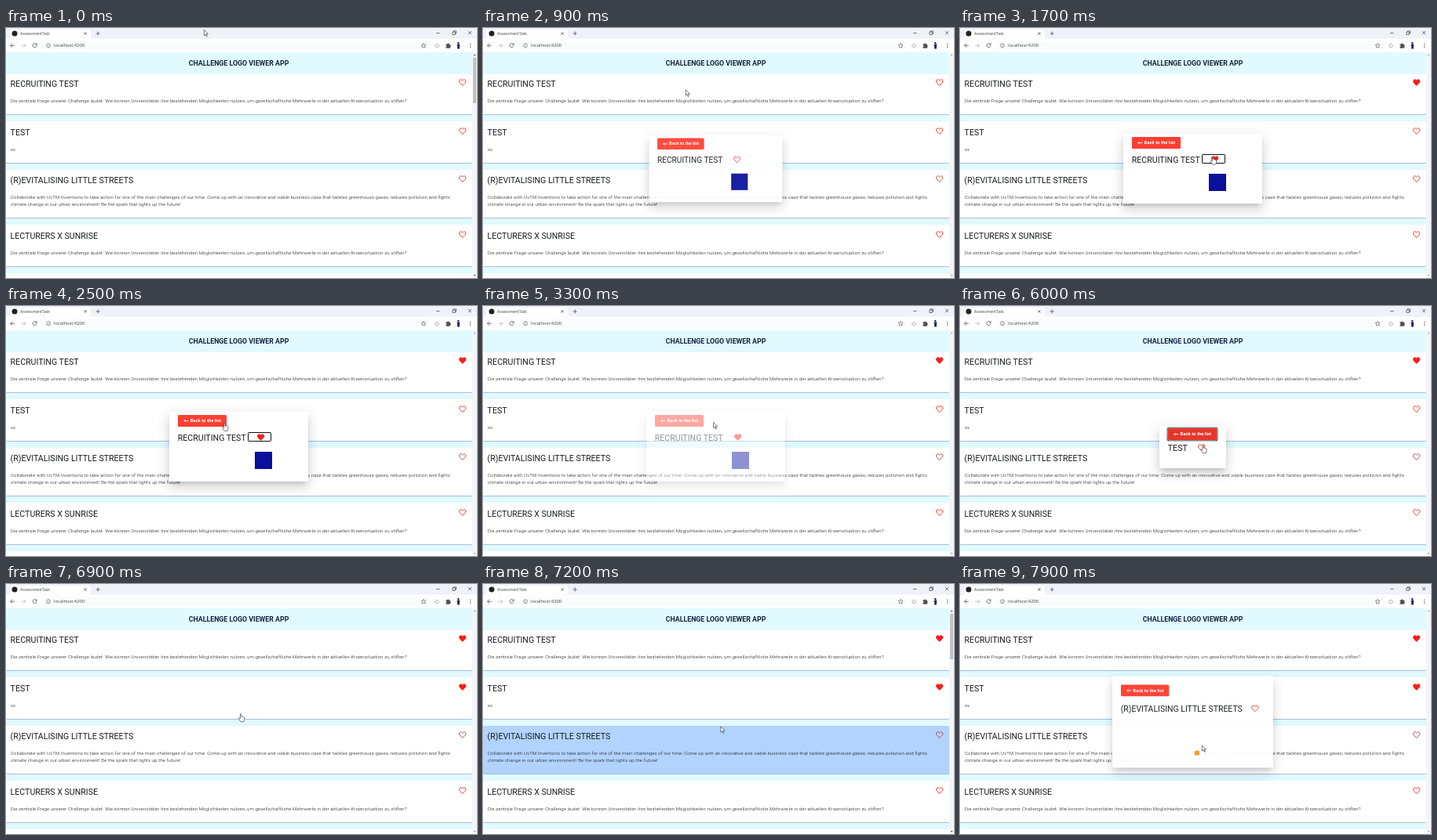
Animation of 600 by 319 pixels, one loop 8000 ms. Source, as an HTML page:

```html
<!DOCTYPE html>
<html lang="en">
<head>
<meta charset="utf-8">
<title>AssessmentTask</title>
<style>
  html, body { margin: 0; width: 100%; height: 100%; overflow: hidden; background: #e1faff; }
  #stage { position: relative; width: 600px; height: 319px; overflow: hidden; font-family: Roboto, sans-serif; color: #1b1c20; }
  #stage div, #stage svg { position: absolute; }
  .text { white-space: pre; line-height: 12px; }
  .head { left: 0; top: 31px; width: 593px; height: 28px; line-height: 28px; text-align: center;
    background: #e1faff; font-size: 8.8px; font-weight: 700; color: #14233f; }
  .title { font-size: 10.6px; }
  .desc { font-size: 6px; font-weight: 300; letter-spacing: .122px; line-height: 9px; color: #08090b; }
  .ui { font-family: "Open Sans", "Noto Sans", sans-serif; color: #3c4043; }
  .card { left: 0; width: 594px; background: #fff; border-radius: 1.5px; border-bottom: 1px solid #a6bfdc; box-sizing: border-box; }
  .bar { left: 594px; top: 31px; width: 6px; height: 288px; background: #f3f4f5; }
  .thumb { left: .8px; top: 7px; width: 4.6px; height: 58px; background: #c1c1c1; }
  .panel { background: #fff; border-radius: 1.5px;
    box-shadow: 0 4px 6px -3px rgba(0,0,0,.2), 0 9px 14px 1px rgba(0,0,0,.09), 0 3px 17px 3px rgba(0,10,50,.07); }
  .back { left: 11px; width: 62px; height: 15.2px; border-radius: 1.6px; background: #ff3f32; }
  .back .text { left: 15.6px; top: 1.6px; font-size: 5.9px; font-weight: 700; color: #fff; }
  .back.focus { background: #e8352a; box-shadow: 0 0 0 .5px #fff, 0 0 0 1.3px #101010; }
  .ring { width: 27.5px; height: 10px; border: 1px solid #101010; border-radius: 1.2px; }
</style>
</head>
<body>
<div id="stage"></div>
<script>
const LOOP = 8000, STEP = 100;
const stage = document.getElementById('stage');
const RED = '#f5281f';

function add(parent, cls, style, text) {
  const el = document.createElement('div');
  el.className = cls;
  for (const k in style) {
    const v = style[k];
    el.style[k] = typeof v === 'number' ? v + 'px' : v;
  }
  if (text) el.textContent = text;
  parent.appendChild(el);
  return el;
}

function svg(parent, x, y, w, h, box, body) {
  const el = document.createElementNS('http://www.w3.org/2000/svg', 'svg');
  el.setAttribute('viewBox', box);
  el.style.cssText = `left:${x}px;top:${y}px;width:${w}px;height:${h}px;overflow:visible`;
  el.innerHTML = body;
  parent.appendChild(el);
  return el;
}

// Heart icon centred on (cx, cy); fillable through its path
const HEART = 'M12 20C7 15.4 3 12.2 3 8.5C3 6 5 4 7.5 4C9.2 4 11 4.9 12 6.5C13 4.9 14.8 4 16.5 4C19 4 21 6 21 8.5C21 12.2 17 15.4 12 20Z';
function heart(parent, cx, cy, color = RED) {
  const el = svg(parent, cx - 5.6, cy - 5.6, 11.2, 11.2, '0 0 24 24',
    `<path d="${HEART}" fill="none" stroke="${color}" stroke-width="2"/>`);
  return on => {
    const p = el.firstChild;
    p.setAttribute('fill', on ? '#ff1d18' : 'none');
    p.setAttribute('stroke', on ? '#ff1d18' : color);
  };
}

// Browser window
svg(stage, 0, 0, 600, 31, '0 0 600 31', `
  <rect width="600" height="31" fill="#fff"/>
  <rect width="600" height="13.5" fill="#eff2f8"/>
  <path d="M3 13.6Q5 13.6 5 11V4.5Q5 2 7.5 2H105.5Q108 2 108 4.5V11Q108 13.6 110.5 13.6Z" fill="#fff"/>
  <circle cx="11" cy="7" r="3.5" fill="#222"/>
  <rect x="46" y="16.7" width="494" height="11" rx="5.5" fill="#fafbfc"/>
  <g fill="none" stroke="#50545a" stroke-width=".8">
    <path d="M99.5 5.3l3.2 3.2m0-3.2l-3.2 3.2M114.7 7h5m-2.5-2.5v5"/>
    <path d="M548 6.5h4.4M568.8 5h3.4v3.4h-3.4zM570 5v-1.2h3.4v3.4h-1.2M588.8 4l4.2 4.2m0-4.2l-4.2 4.2" stroke="#222" stroke-width=".6"/>
    <path d="M11 22.3H5.7m2.5-2.6l-2.6 2.6l2.6 2.6"/>
    <path d="M19.5 22.3h5.3m-2.5-2.6l2.6 2.6l-2.6 2.6" stroke="#b4b7bb"/>
    <path d="M38.6 20.4a2.6 2.6 0 1 0 .6 2.3m0-3.3v2h-2"/>
    <circle cx="54" cy="22.3" r="2.5" stroke-width=".6"/>
    <path d="M54 22v1.6m0-3v.7" stroke-width=".6"/>
    <path d="M532 19.4l.9 2l2.1.2l-1.6 1.4l.5 2.1l-1.9-1.1l-1.9 1.1l.5-2.1l-1.6-1.4l2.1-.2z" stroke-width=".6"/>
    <path d="M547.7 20.7a2.3 2.3 0 1 0 2.6 0M549 19.6v2.5" stroke="#8a8d92" stroke-width=".7"/>
  </g>
  <path d="M560.4 20.6h1.8a1 1 0 0 1 2 0h1.6v1.6a1 1 0 0 1 0 2v1.5h-5.4v-1.6a.9.9 0 0 0 0-1.8z" fill="#4d5156"/>
  <circle cx="576.2" cy="19.2" r="1.2" fill="#1a2558"/>
  <path d="M574.4 20.8h3.8l-.4 2.6v3h-2.8v-3z" fill="#1a2558"/>
  <g fill="#50545a"><circle cx="591.5" cy="20.2" r=".6"/><circle cx="591.5" cy="22.3" r=".6"/><circle cx="591.5" cy="24.4" r=".6"/></g>`);
add(stage, 'text ui', { left: 18, top: 1, fontSize: 5 }, 'AssessmentTask');
add(stage, 'text ui', { left: 61, top: 16.2, fontSize: 5.8 }, 'localhost:4200');

// Page
const question = 'Die zentrale Frage unserer Challenge lautet: Wie können Universitäten ihre bestehenden Möglichkeiten nutzen, um gesellschaftliche Mehrwerte in der aktuellen Krisensituation zu stiften?';
const green = '(R)EVITALISING LITTLE STREETS';
const cards = [
  [57.75, 53.25, 'RECRUITING TEST', question],
  [119.25, 53.25, 'TEST', 'xx'],
  [180.75, 62.25, green, 'Collaborate with UvTM Inventions to take action for one of the main challenges of our time: Come up with an innovative and viable business case that tackles greenhouse gases, reduces pollution and fights\nclimate change in our urban environment! Be the spark that lights up the future!', '#a9483a'],
  [251.25, 53.75, 'LECTURERS X SUNRISE', question],
  [313, 53.25]
].map(([top, height, name, desc, color]) => {
  const el = add(stage, 'card', { top, height });
  if (!name) return { el };
  add(el, 'text title', { left: 5.6, top: 8.3 }, name);
  add(el, 'text desc', { left: 6, top: 30.7 }, desc);
  return { el, like: heart(el, 581.5, 12.3, color) };
});
add(stage, 'head', {}, 'CHALLENGE LOGO VIEWER APP');

const bar = add(stage, 'bar', {});
const thumb = add(bar, 'thumb', {});
const arrows = svg(bar, 0, 0, 6, 288, '0 0 6 288', '<path d="M1.5 4.3L3 2.5L4.5 4.3ZM1.5 284L3 285.8L4.5 284Z"/>');

// Dialogs: box, button top, title centre, heart x, then life times and frames of [scale, opacity]
function dialog(o) {
  const el = add(stage, 'panel', { left: o.x, top: o.y, width: o.w, height: o.h });
  const back = add(el, 'back', { top: o.button });
  svg(back, 7, 5, 7, 5.2, '0 0 7 5.2', '<path d="M6.4 2.6H.9M2.6 .9L.9 2.6L2.6 4.3" fill="none" stroke="#fff" stroke-width=".9"/>');
  add(back, 'text', {}, 'Back to the list');
  add(el, 'text title', { left: 10.8, top: o.mid - 5.2 }, o.name);
  const ring = add(el, 'ring', { left: o.heart - 16, top: o.mid - 7.5 });
  const like = heart(el, o.heart, o.mid - 1);
  if (o.mark) {
    const [cx, cy, size, color] = o.mark;
    add(el, 'mark', { left: cx - size / 2, top: cy - size / 2, width: size, height: size, background: color });
  }
  return { ...o, el, back, ring, like };
}
const dialogs = [
  dialog({ x: 208, y: 135, w: 177, h: 89, button: 3.5, mid: 33.5, heart: 116.3, name: 'RECRUITING TEST',
    mark: [120, 62, 22, '#0a0f9c'], open: 900, focus: 1000, liked: 1600, unring: 2900, close: 3300, done: 3500,
    intro: [[.96, .93]], card: 0 }),
  dialog({ x: 254, y: 153, w: 85, h: 54, button: 2.7, mid: 28.5, heart: 54, name: 'TEST',
    open: 5200, focus: 5400, liked: 6200, unring: 6600, close: 6800, done: 7000,
    intro: [[.92, .6], [.99, .95]], card: 1 }),
  dialog({ x: 192.5, y: 116.5, w: 207, h: 118, button: 11.3, mid: 42.5, heart: 184, name: green,
    mark: [109, 98.5, 6, '#f0a01e'], open: 7800, focus: LOOP, liked: LOOP, unring: LOOP, close: LOOP, done: LOOP,
    intro: [[.9, .55], [.99, .97]], card: 2 })
];

// Pointer
const arrow = svg(stage, 0, 0, 7, 10, '0 0 7 10',
  '<path d="M.3 .3V7.6L2 6.1L3.2 8.9L4.4 8.4L3.2 5.7H5.5Z" fill="#fff" stroke="#222" stroke-width=".6"/>');
const hand = svg(stage, 0, 0, 9, 11, '0 0 9 11',
  '<path d="M3 6.6V1.2Q3.7 .1 4.4 1.2V4.2Q5.2 3.6 5.7 4.5Q6.5 4 7 4.9Q8.1 4.6 8.2 5.7V8L7.4 10.7H3.5L1 7.2Q.5 6 1.5 5.8Z" fill="#fff" stroke="#222" stroke-width=".6"/>');
const path = [
  [100, 252, 2], [600, 258, 78.5], [900, 258, 78.5], [1400, 322, 164], [1800, 322, 164],
  [2400, 278.3, 149.3], [2500, 278.3, 149.3], [2900, 271.5, 144], [3100, 271.5, 144], [3500, 315, 152],
  [3700, 315, 152], [4400, 241, 150], [4700, 241, 150], [4800, 238.5, 151], [5000, 235, 157],
  [5300, 235, 157], [5900, 309.5, 177.5], [6300, 309.5, 177.5], [6700, 299, 165.5], [7000, 299, 165.5], [7500, 308, 205.5]
];
const hovers = [[0, 500, 900], [1, 3500, 5200], [1, 7000, 7200], [2, 7200, 7800]];
const within = (t, a, b) => t >= a && t < b;

function pointAt(t) {
  const i = path.findIndex(p => p[0] > t);
  if (i === 0) return path[0].slice(1);
  if (i < 0) return path[path.length - 1].slice(1);
  const [a, b] = [path[i - 1], path[i]], k = (t - a[0]) / (b[0] - a[0]);
  return [a[1] + (b[1] - a[1]) * k, a[2] + (b[2] - a[2]) * k];
}

function draw(t) {
  cards.forEach((c, i) => {
    const h = hovers.find(([n, a, b]) => n === i && within(t, a, b));
    const k = h ? Math.min(1, (t - h[1] + STEP) / 200) : 0;
    c.el.style.backgroundColor = `rgb(${[98, 167, 251].map(v => Math.round(255 + (v - 255) * k))})`;
  });

  let blocked = false;
  for (const d of dialogs) {
    const live = within(t, d.open, d.done), gone = t >= d.close + STEP;
    const [scale, opacity] = d.intro[(t - d.open) / STEP] || [1, t >= d.close ? .45 : 1];
    const liked = t >= d.liked;
    blocked = blocked || live;
    d.el.style.display = live && !gone ? '' : 'none';
    d.el.style.transform = `scale(${scale})`;
    d.el.style.opacity = opacity;
    d.back.classList.toggle('focus', within(t, d.focus, d.liked));
    d.ring.style.display = within(t, d.liked, d.unring) ? '' : 'none';
    d.like(liked);
    cards[d.card].like(liked);
  }
  thumb.style.display = blocked ? 'none' : '';
  arrows.style.fill = blocked ? '#a3a3a3' : '#505050';

  const [x, y] = pointAt(t);
  const pointing = within(t, 1300, 3300) || within(t, 5800, 7000);
  arrow.style.display = pointing ? 'none' : '';
  hand.style.display = pointing ? '' : 'none';
  arrow.style.transform = `translate(${x}px,${y}px)`;
  hand.style.transform = `translate(${x - 3.6}px,${y - .6}px)`;
}

const start = performance.now();
function tick() {
  const t = (performance.now() - start) % LOOP;
  draw(Math.floor(t / STEP) * STEP);
  requestAnimationFrame(tick);
}
tick();
</script>
</body>
</html>
```
